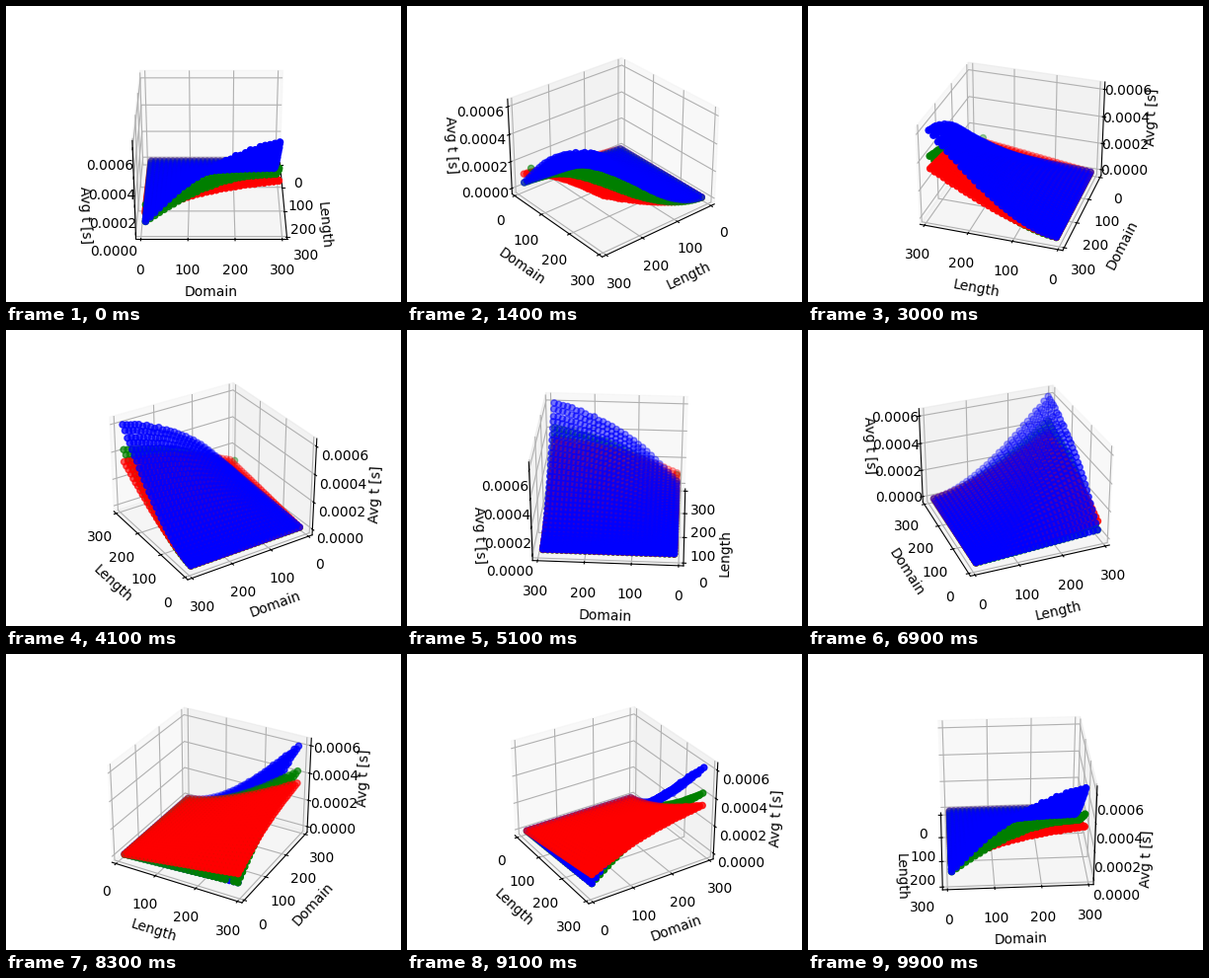
A matplotlib script that plays this animation: 400 by 300 pixels, repeating every 10000 ms.

```python
import numpy as np
import matplotlib.pyplot as plt
from matplotlib.animation import FuncAnimation

FRAMES = 100
PEAK = 6.1e-4

rng = np.random.default_rng(4)
steps = np.arange(10, 300, 10)
length, domain = (g.ravel() for g in np.meshgrid(steps, steps, indexing="ij"))

# Expected number of distinct values in a random list
distinct = domain * (1 - (1 - 1 / domain) ** length)


def timing(base, per_value, setup=0.0):
    """Average run time: linear in length and in distinct values."""
    cost = setup + length / 290 * (base + per_value * distinct)
    return PEAK * cost * (1 + 0.006 * rng.standard_normal(cost.size))


red = timing(0.1655, 0.00214)
green = timing(0.044, 0.00358)
blue = timing(0.022, 0.0053, setup=0.006)
green[(length == 270) & (domain == 10)] = 0.22 * PEAK

fig = plt.figure(figsize=(4, 3), dpi=100)
ax = fig.add_subplot(projection="3d")
for times, color in ((red, "r"), (green, "g"), (blue, "b")):
    ax.scatter(length, domain, times, color=color)

ax.set_xlabel("Length")
ax.set_ylabel("Domain")
ax.set_zlabel("Avg t [s]")
ax.set_xticks(range(0, 301, 100))
ax.set_yticks(range(0, 301, 100))
ax.set_zticks(np.arange(4) * 2e-4)


def update(i):
    ax.view_init(elev=30, azim=360 * i / FRAMES)
    return ()


anim = FuncAnimation(fig, update, frames=FRAMES, init_func=lambda: (),
                     interval=100, repeat=True, repeat_delay=0)
plt.show()
```
